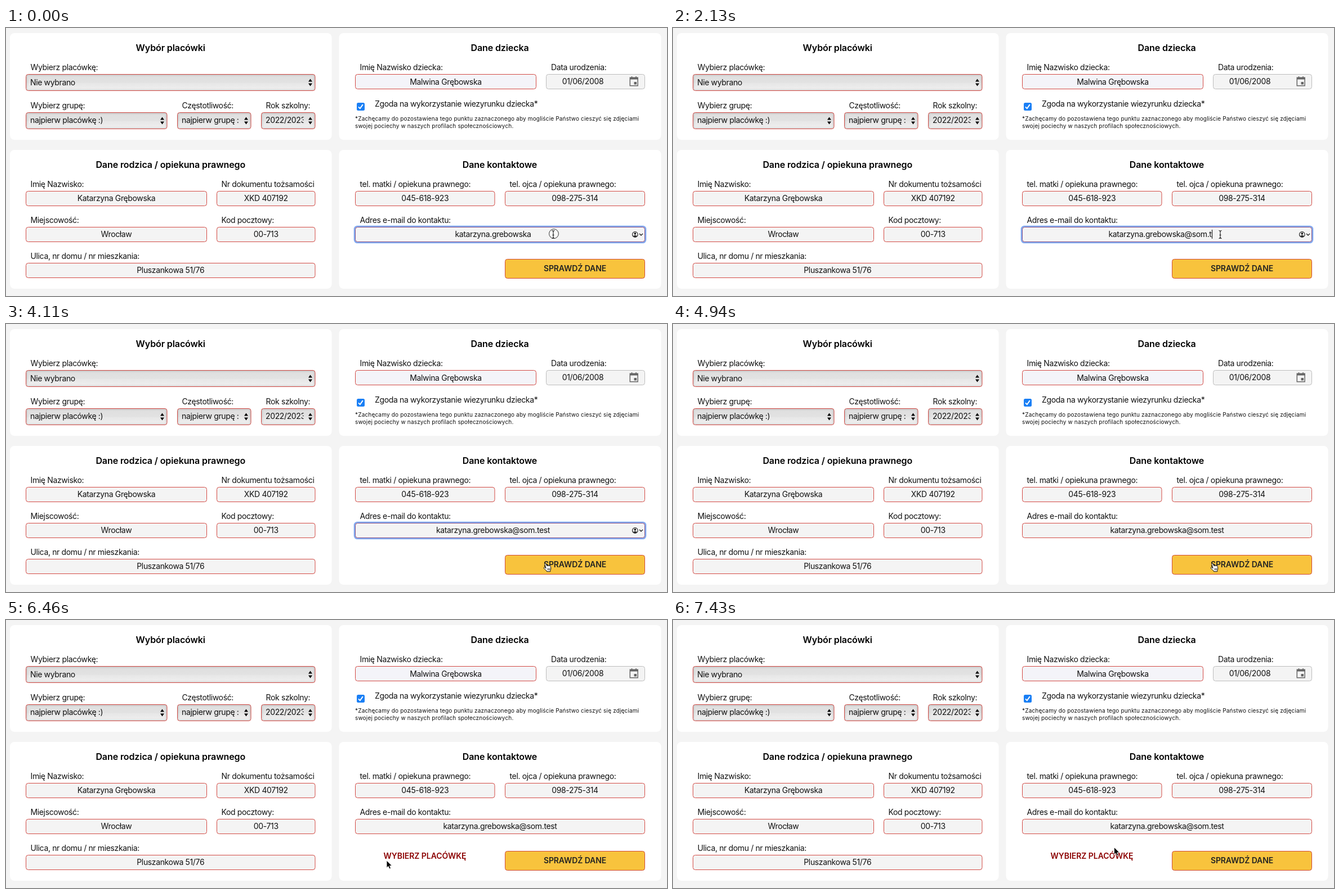
Recreate the animation shown at these times as an HTML page. Size 1174 by 477 pixels, loop 8000 ms.

```html
<!DOCTYPE html>
<html lang="pl">
<head>
<meta charset="utf-8">
<title>Formularz</title>
<style>
html, body { margin: 0; width: 100%; height: 100%; overflow: hidden; background: #f4f4f4; }
svg { display: block; }
text { font: 14px Inter, sans-serif; letter-spacing: -.36px; fill: #111; white-space: pre; }
.title { font-size: 16px; font-weight: 600; letter-spacing: -.1px; fill: #000; }
.bold { font-weight: 600; letter-spacing: -.1px; fill: #222; }
.alert { font-weight: 600; letter-spacing: -.05px; fill: #8b0000; }
.small { font-size: 10px; letter-spacing: .17px; }
.mid { text-anchor: middle; }
</style>
</head>
<body>
<svg id="stage" width="1174" height="477" viewBox="0 0 1174 477">
  <defs>
    <linearGradient id="gloss" x2="0" y2="1">
      <stop offset="0" stop-color="#dedede"/>
      <stop offset=".5" stop-color="#e2e2e2"/>
      <stop offset=".55" stop-color="#e7e7e7"/>
      <stop offset="1" stop-color="#f0f0f0"/>
    </linearGradient>
    <clipPath id="yearClip"><rect x="455" y="150" width="73.5" height="30"/></clipPath>
  </defs>
  <g id="form"></g>
  <g id="focus">
    <rect x="619" y="353" width="517" height="29" rx="5" fill="none" stroke="#80aaf2" stroke-width="2.6"/>
    <rect x="620.5" y="354.5" width="514" height="26" rx="4" fill="#f4f4f4" stroke="#8f5584"/>
    <circle cx="1117.3" cy="367.5" r="4.8" fill="#fff" stroke="#222" stroke-width="1.2"/>
    <circle cx="1117.3" cy="366" r="1.9" fill="#222"/>
    <path d="M1113.8 370.3q3.5-3 7 0q-3.5 3.6-7 0" fill="#222"/>
    <path d="M1125 366l3 3 3-3" fill="none" stroke="#222" stroke-width="1.4"/>
  </g>
  <text id="email" class="mid" y="372"></text>
  <rect id="caret" y="359" width="1" height="16"/>
  <text id="alert" class="alert mid" x="744" y="425">WYBIERZ PLACÓWKĘ</text>
  <g id="beam" fill="none">
    <circle id="ring" cx="1" cy="-1.3" r="8.4" fill="#fff" fill-opacity=".35" stroke="#333"/>
    <path d="M-2.5-7q2.5 0 2.5 2V5q0 2-2.5 2M2.5-7Q0-7 0-5V5q0 2 2.5 2M-1.5 1h3" stroke="#fff" stroke-width="2.4" opacity=".7"/>
    <path d="M-2.5-7q2.5 0 2.5 2V5q0 2-2.5 2M2.5-7Q0-7 0-5V5q0 2 2.5 2M-1.5 1h3" stroke="#111" stroke-width="1.1"/>
  </g>
  <path id="arrow" d="M0 0V13.2L3 10.4 5 15 7.4 14 5.5 9.5H9.6Z" fill="#000" stroke="#fff" stroke-width=".9" stroke-linejoin="round"/>
  <g id="hand" stroke="#111" stroke-linejoin="round" stroke-linecap="round">
    <path d="M-1.2.8Q-.6-.6.7.3L2.6 4.6Q4 3.4 5 4.5Q6.4 3.4 7.3 4.6Q9 3.8 9.3 5.6L9.8 9Q9.8 11 8.8 12.4V14.6H2.4V13.4Q-.2 11.6-2.6 8.8Q-3.3 7.2-1.5 7.2L.8 8.6Z" fill="#fff"/>
    <path d="M4.2 9v3M6 9v3M7.8 9v3" fill="none" stroke-width=".8"/>
  </g>
</svg>
<script>
const LOOP = 8000;
const USER = "katarzyna.grebowska", DOMAIN = "@som.test";
const $ = id => document.getElementById(id);
const form = $("form");

function add(tag, attrs, content) {
  const el = document.createElementNS("http://www.w3.org/2000/svg", tag);
  for (const key in attrs) el.setAttribute(key, attrs[key]);
  if (content) el.textContent = content;
  form.append(el);
  return el;
}
const box = (x, y, w, h, fill, stroke = "#d34a44", rx = 4) =>
  add("rect", { x: x + .5, y: y + .5, width: w - 1, height: h - 1, rx, fill, stroke });
const text = (x, y, str, cls = "") => add("text", { x, y, class: cls }, str);

function card(x, y, w, h, title) {
  add("rect", { x, y, width: w, height: h, rx: 8, fill: "#fff" });
  text(x + w / 2 - .5, y + 32, title, "title mid");
}
function field(x, y, w, label, value, fill = "#f4f4f4") {
  text(x + 8.5, y - 7, label);
  box(x, y, w, 27, fill);
  if (value) text(x + w / 2, y + 18, value, "mid");
}
function select(x, y, w, label, value) {
  text(x + 8.5, y - 7, label);
  box(x, y, w, 30, "url(#gloss)");
  for (const i of [1, 2, 3]) {
    add("rect", { x: x + i + .5, y: y + i + .5, width: w - 2 * i - 1, height: 29 - 2 * i, rx: 4 - i,
      fill: "none", stroke: "#000", "stroke-opacity": .1 / i });
  }
  const cx = x + w - 9, cy = y + 15;
  add("path", { d: `M${cx - 3.5} ${cy - 1.5}h7l-3.5-5zM${cx - 3.5} ${cy + 1.5}h7l-3.5 5z` });
  return text(x + 8, y + 19, value);
}

card(7, 9, 571.5, 190, "Wybór placówki");
select(35, 82, 514.5, "Wybierz placówkę:", "Nie wybrano").setAttribute("y", 102);
select(35, 150, 251.5, "Wybierz grupę:", "najpierw placówkę :)");
select(304, 150, 131.5, "Częstotliwość:", "najpierw grupę :");
select(453, 150, 96.5, "Rok szkolny:", "2022/2023").setAttribute("clip-path", "url(#yearClip)");

card(591.5, 9, 572, 190, "Dane dziecka");
field(620, 82, 322, "Imię Nazwisko dziecka:", "", "#f4f4f9");
text(781, 101, "Malwina Grębowska", "mid");
text(968, 75, "Data urodzenia:");
box(959, 82, 176, 27, "#f4f4f4", "#bdbdbd");
text(1024.5, 99.5, "01/06/2008", "mid");
add("path", { d: "M1108.3 88.3h13.8v14.4h-13.8zM1111.5 86v3M1119 86v3", fill: "none", stroke: "#666", "stroke-width": 1.5 });
add("path", { d: "M1108 88h14.4v3.5H1108zM1115.5 96h4.5v4.5h-4.5z", fill: "#666" });
add("rect", { x: 623, y: 133, width: 14, height: 14, rx: 2.5, fill: "#1a7ff5" });
add("path", { d: "M626 140.3l2.8 3 5-7.2", fill: "none", stroke: "#fff", "stroke-width": 1.9 });
text(655, 139.5, "Zgoda na wykorzystanie wiezyrunku dziecka*");
text(620, 165, "*Zachęcamy do pozostawiena tego punktu zaznaczonego aby mogliście Państwo cieszyć się zdjęciami", "small");
text(620, 178, "swojej pociechy w naszych profilach społecznościowych.", "small");

card(7, 217, 571.5, 247, "Dane rodzica / opiekuna prawnego");
field(35, 290, 322, "Imię Nazwisko:", "Katarzyna Grębowska");
field(374, 290, 175.5, "Nr dokumentu tożsamości", "XKD 407192");
field(35, 354, 322, "Miejscowość:", "Wrocław");
field(374, 354, 175.5, "Kod pocztowy:", "00-713");
field(35, 418, 514.5, "Ulica, nr domu / nr mieszkania:", "Pluszankowa 51/76");

card(591.5, 217, 572, 247, "Dane kontaktowe");
field(620, 290, 248.5, "tel. matki / opiekuna prawnego:", "045-618-923");
field(886, 290, 249, "tel. ojca / opiekuna prawnego:", "098-275-314");
field(620, 354, 515, "Adres e-mail do kontaktu:");
box(886, 411, 249, 35, "#f8c33d", "#d04a38");
text(1010.5, 433, "SPRAWDŹ DANE", "bold mid");

// Pointer journeys: start, end, number of steps, points passed on the way
const MOVES = [
  [3470, 4110, 11, [[968, 371], [920, 388], [845, 404], [814, 414], [850, 424], [920, 430], [958, 426]]],
  [5720, 6520, 15, [[904, 417], [860, 396], [790, 388], [725, 396], [682, 418], [671, 436], [676, 428], [681, 430]]],
  [6570, 7430, 16, [[684, 434], [705, 448], [745, 454], [790, 446], [818, 428], [812, 412], [794, 408], [783.5, 404.5]]]
];

function spline(pts, u) {
  const s = u * (pts.length - 1), i = Math.min(Math.floor(s), pts.length - 2), f = s - i;
  const at = k => pts[Math.max(0, Math.min(pts.length - 1, k))];
  return [0, 1].map(c => {
    const [a, b, d, e] = [-1, 0, 1, 2].map(k => at(i + k)[c]);
    return b + f / 2 * (d - a + f * (2 * a - 5 * b + 4 * d - e + f * (3 * (b - d) + e - a)));
  });
}
function pointer(t) {
  let pos = [972, 367.5];
  for (const [start, end, steps, pts] of MOVES) {
    if (t < start) break;
    const k = Math.floor((t - start) / (end - start) * (steps - 1) + .001);
    pos = spline(pts, Math.min(1, k / (steps - 1)));
  }
  return pos;
}
function caretOn(t) {
  if (t < 1130) return t >= 350 && t < 830;
  if (t < 2930) return true;
  return (t >= 3470 && t < 4000) || (t >= 4580 && t < 4880);
}
const show = (id, on) => $(id).setAttribute("visibility", on ? "visible" : "hidden");

function draw(t) {
  const focused = t < 4880;
  const typed = t < 1130 ? 0 : Math.min(DOMAIN.length, Math.floor((t - 1130) / 200) + 1);
  const email = $("email"), cx = focused ? 865 : 877.5;
  email.textContent = USER + DOMAIN.slice(0, typed);
  email.setAttribute("x", cx);
  $("caret").setAttribute("x", Math.round(cx + email.getComputedTextLength() / 2));
  show("focus", focused);
  show("caret", caretOn(t));
  show("alert", t >= 4970);

  const [x, y] = pointer(t);
  const kind = x > 886 && y > 411 ? "hand" : x > 620 && y > 354 && y < 381 ? "beam" : "arrow";
  for (const id of ["hand", "beam", "arrow"]) {
    show(id, id === kind);
    $(id).setAttribute("transform", `translate(${x} ${y})`);
  }
  show("ring", t < 50);
}

const begin = performance.now();
function tick() {
  draw((performance.now() - begin) % LOOP);
  requestAnimationFrame(tick);
}
draw(0);
requestAnimationFrame(tick);
</script>
</body>
</html>
```
